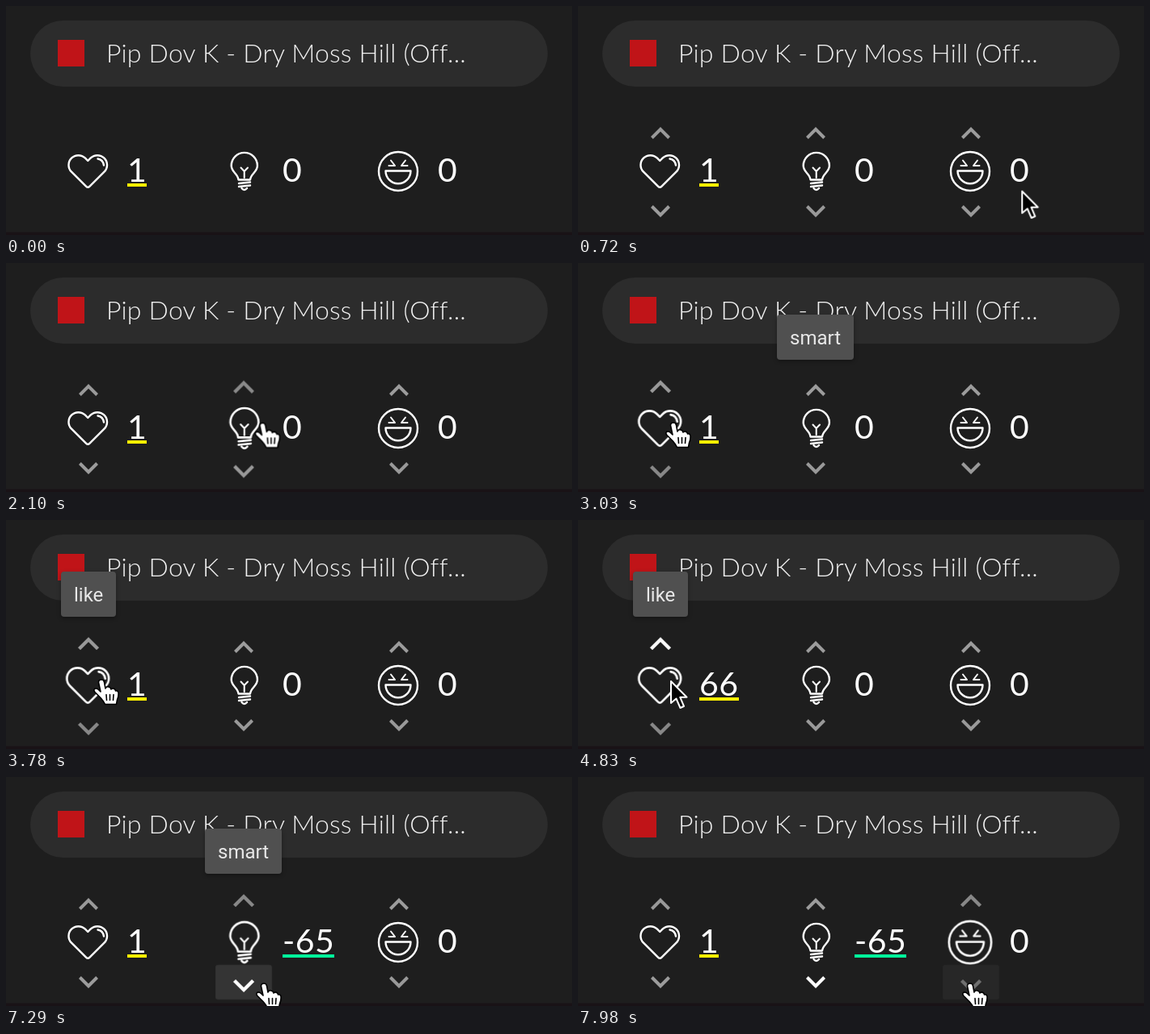
An HTML page that plays this animation: 700x284 px, repeating every 8 s.

```html
<!DOCTYPE html>
<html lang="en">
<head>
<meta charset="utf-8">
<title>Reaction voting</title>
<style>
html, body { margin: 0; width: 100%; height: 100%; overflow: hidden; background: #1e1e1e; }
body { position: relative; }
svg { position: absolute; left: 0; top: 0; }

.title {
  position: absolute; left: 124px; top: 39px; white-space: nowrap;
  font: 300 32px/38px Lato, "Open Sans", sans-serif; color: #f2f2f2; letter-spacing: .2px;
}
.count {
  position: absolute; top: 182px; height: 38px; white-space: nowrap;
  font: 400 41px/42px Lato, "Open Sans", sans-serif; color: #fff; letter-spacing: .5px;
  border-bottom: 4px solid transparent;
}
#like { left: 150px; border-color: #fff000; }
#smart { left: 342px; }
#smart.voted { border-color: #00f59b; }
#funny { left: 534px; }

/* every animated part shares the 8 s loop */
.anim { animation: 8s ease-in-out infinite both; }

.tip {
  position: absolute; top: 64px; height: 56px; padding: 0 16px; border-radius: 4px;
  font: 400 24px/58px Roboto, sans-serif; color: #e8e8e8; background: #505050;
  box-shadow: 0 2px 5px rgba(0, 0, 0, .35); opacity: 0;
}
.t-like { left: 68px; animation-name: tipLike; }
.t-smart { left: 246px; animation-name: tipSmart; }
.t-funny { left: 440px; animation-name: tipFunny; }
@keyframes tipLike {
  0%, 44.6% { opacity: 0; transform: translateY(30px); }
  44.61% { opacity: 1; transform: translateY(30px); }
  47.25%, 69.5% { opacity: 1; transform: none; }
  71.5%, 100% { opacity: 0; transform: none; }
}
@keyframes tipSmart {
  0%, 29.4% { opacity: 0; transform: translateY(30px); }
  29.41% { opacity: 1; transform: translateY(30px); }
  32%, 38.25% { opacity: 1; transform: none; }
  40.25% { opacity: 0; transform: none; }
  41%, 76.8% { opacity: 0; transform: translateY(30px); }
  76.81%, 76.9% { opacity: 1; transform: translateY(30px); }
  79.5%, 94% { opacity: 1; transform: none; }
  95.5%, 100% { opacity: 0; transform: none; }
}
@keyframes tipFunny {
  0%, 15.1% { opacity: 0; transform: translateY(30px); }
  15.11% { opacity: 1; transform: translateY(30px); }
  17.75%, 23% { opacity: 1; transform: none; }
  25%, 100% { opacity: 0; transform: none; }
}

.icon { fill: none; stroke: #fff; stroke-width: 2.4; stroke-linecap: round; stroke-linejoin: round; }
.chevrons { animation-name: reveal; }
@keyframes reveal { 0%, 6% { opacity: 0; } 9%, 100% { opacity: 1; } }

/* a hovered column grows and its chevrons, which inherit the fill, dim */
.c-like { transform-origin: 102px 205px; animation-name: growLike; }
.c-smart { transform-origin: 294px 205px; animation-name: growSmart; }
.c-funny { transform-origin: 486px 205px; animation-name: growFunny; }
@keyframes growLike {
  0%, 36.2%, 70.2%, 100% { transform: none; fill: #9c9c9c; }
  37.5%, 68.8% { transform: scale(1.09); fill: #888; }
}
@keyframes growSmart {
  0%, 25.1%, 37%, 71.2%, 94%, 100% { transform: none; fill: #9c9c9c; }
  26.6%, 35.6%, 72.7%, 92.5% { transform: scale(1.09); fill: #888; }
}
@keyframes growFunny {
  0%, 10.6%, 23.8%, 95.2% { transform: none; fill: #9c9c9c; }
  12.5%, 22.2%, 97%, 100% { transform: scale(1.09); fill: #888; }
}

.up-like { animation-name: upLike; }
.down-smart { animation-name: downSmart; }
.down-funny { animation-name: downFunny; }
@keyframes upLike { 0%, 51%, 80%, 100% { fill: #999; } 62%, 77% { fill: #fff; } }
@keyframes downSmart { 0%, 72.3% { fill: #999; } 74%, 77% { fill: #666; } 81%, 100% { fill: #fff; } }
@keyframes downFunny { 0%, 95.6% { fill: #999; } 97.5%, 100% { fill: #707070; } }

.pad { fill: #fff; opacity: 0; }
.p-funny-up { animation-name: padFunnyUp; }
.p-smart { animation-name: padSmart; }
.p-funny { animation-name: padFunny; }
.ripple { fill: #fff; animation-name: ripple; transform-origin: 298px 252px; }
@keyframes padFunnyUp { 0%, 13.5%, 23%, 100% { opacity: 0; } 15.5%, 21.5% { opacity: .035; } }
@keyframes padSmart { 0%, 72.3%, 94%, 100% { opacity: 0; } 74%, 77% { opacity: .045; } 81%, 92.5% { opacity: .1; } }
@keyframes padFunny { 0%, 95.6% { opacity: 0; } 97.5%, 100% { opacity: .045; } }
@keyframes ripple {
  0%, 76.5% { opacity: 0; transform: scale(.2); }
  76.87% { opacity: .04; transform: scale(.35); }
  80% { opacity: .08; transform: none; }
  85%, 100% { opacity: 0; transform: none; }
}

.cursor { animation-name: travel; }
.hand { animation-name: hand; animation-timing-function: step-end; }
.arrow { animation-name: arrow; animation-timing-function: step-end; }
@keyframes travel {
  0%, 3.75% { transform: translate(622px, 290px); }
  13.5% { transform: translate(494px, 184px); }
  16.1%, 21% { transform: translate(492px, 180px); }
  27%, 35.25% { transform: translate(312px, 200px); }
  37.25%, 50.9% { transform: translate(118px, 199px); }
  51%, 67.5% { transform: translate(115px, 200px); }
  74.6%, 87% { transform: translate(299px, 257px); }
  90%, 91.25% { transform: translate(319px, 257px); }
  97.5%, 100% { transform: translate(485px, 257px); }
}
@keyframes hand {
  0%, 22.1%, 35.6%, 51%, 92.5% { opacity: 0; }
  11.2%, 25.5%, 36.5%, 72.2%, 95.5%, 100% { opacity: 1; }
}
@keyframes arrow {
  0%, 11.2%, 25.5%, 36.5%, 72.2%, 95.5%, 100% { opacity: 0; }
  3.75%, 22.1%, 35.6%, 51%, 92.5% { opacity: 1; }
}
</style>
</head>
<body>
<svg width="700" height="284" viewBox="0 0 700 284">
  <defs>
    <path id="up" d="M-9.18 7.4 0-1.76 9.18 7.4 12 4.6 0-7.4-12 4.6z"/>
    <clipPath id="padClip"><rect x="262" y="230.7" width="64" height="39.5" rx="3"/></clipPath>
  </defs>
  <rect y="280.5" width="700" height="4" fill="#191216"/>
  <rect x="30" y="18" width="640" height="82" rx="41" fill="#2c2c2c"/>
  <rect x="64" y="42" width="33" height="33" fill="#c01418"/>

  <g class="anim c-like">
    <g class="anim chevrons">
      <use class="anim up-like" href="#up" x="102" y="157.5"/>
      <use href="#up" transform="translate(102 254.5) scale(1 -1)"/>
    </g>
    <g class="icon">
      <path d="M101.25 192 98 188.7A12 12 0 0 0 81 205.7L99 223.7Q101.25 226 103.5 223.7L121.5 205.7A12 12 0 0 0 104.5 188.7Z"/>
      <path d="M113.5 189.5Q120 190.5 121 197.5"/>
    </g>
  </g>

  <g class="anim c-smart">
    <rect class="anim pad p-smart" x="262" y="230.7" width="64" height="39.5" rx="3"/>
    <g clip-path="url(#padClip)"><circle class="anim ripple" cx="298" cy="252" r="40"/></g>
    <g class="anim chevrons">
      <use href="#up" x="294" y="157.5"/>
      <use class="anim down-smart" href="#up" transform="translate(294 254.5) scale(1 -1)"/>
    </g>
    <g class="icon">
      <path d="M287.5 215.5C287 208 278.7 206 278.7 198A16.1 16.1 0 0 1 310.9 198C310.9 206 302.5 208 302 215.5Z"/>
      <path d="M290.5 200.5 294.7 205 299 200.5M294.7 205V213" stroke-width="2"/>
      <path d="M288 220 302 218.5M288 224 302 222.5M291.5 226Q294.7 230 298 226"/>
    </g>
  </g>

  <g class="anim c-funny">
    <rect class="anim pad p-funny-up" x="454" y="139.8" width="64" height="39.5" rx="3"/>
    <rect class="anim pad p-funny" x="454" y="230.7" width="64" height="39.5" rx="3"/>
    <g class="anim chevrons">
      <use href="#up" x="486" y="157.5"/>
      <use class="anim down-funny" href="#up" transform="translate(486 254.5) scale(1 -1)"/>
    </g>
    <g class="icon">
      <circle cx="485" cy="205" r="24"/>
      <path d="M476 191.5 481 198 473.5 198M494 191.5 489 198 496.5 198" stroke-width="2"/>
      <path d="M469.5 204.5H500.5A15.5 15.8 0 0 1 469.5 204.5Z"/>
    </g>
  </g>
</svg>

<div class="title">Pip Dov K - Dry Moss Hill (Off...</div>
<span class="count" id="like">1</span>
<span class="count" id="smart">0</span>
<span class="count" id="funny">0</span>

<div class="tip anim t-like">like</div>
<div class="tip anim t-smart">smart</div>
<div class="tip anim t-funny">funny</div>

<svg width="700" height="284" viewBox="0 0 700 284">
  <g class="anim cursor">
    <g class="anim hand" stroke="#000" stroke-width="1.6" stroke-linejoin="round" stroke-linecap="round">
      <path fill="#fff" d="M-3.5 2.5Q-3.5-1 0-1Q3-1 3.5 2L5 10Q6 7 9 8Q11.5 8.5 12 11Q14 9 16 10.5Q17.5 11.5 17.5 13Q20 12 21 15Q21.5 20 19.5 24L18.5 29.5H4.5Q3 26-1 21.5L-8 14.5Q-10 12-8.5 10.5Q-6.5 9-3.5 11.5L-1 14Z"/>
      <path d="M6 17.5 6.5 24.5M10.5 17.5V24.5M15 17.5 14.5 24.5"/>
    </g>
    <path class="anim arrow" d="M0 0V27L6.5 21.5 11.5 33 16 31 11.3 19.8H19.5Z" fill="#000" stroke="#fff" stroke-width="2" stroke-linejoin="round"/>
  </g>
</svg>

<script>
const LOOP = 8000, RUN = 750, VOTES = 65;
const LIKE_AT = 4080, SMART_AT = 6150;
const like = document.getElementById("like");
const smart = document.getElementById("smart");

// eased progress of a count that starts at the given time
const progress = (t, at) => {
  const p = Math.min(1, Math.max(0, (t - at) / RUN));
  return p * (2 - p);
};

let start;
function draw(now) {
  start ??= now;
  const t = (now - start) % LOOP;
  const up = Math.round(VOTES * progress(t, LIKE_AT));
  const down = Math.round(VOTES * progress(t, SMART_AT));
  like.textContent = 1 + up - down;
  smart.textContent = down ? -down : 0;
  smart.classList.toggle("voted", down > 0);
  requestAnimationFrame(draw);
}
requestAnimationFrame(draw);
</script>
</body>
</html>
```
